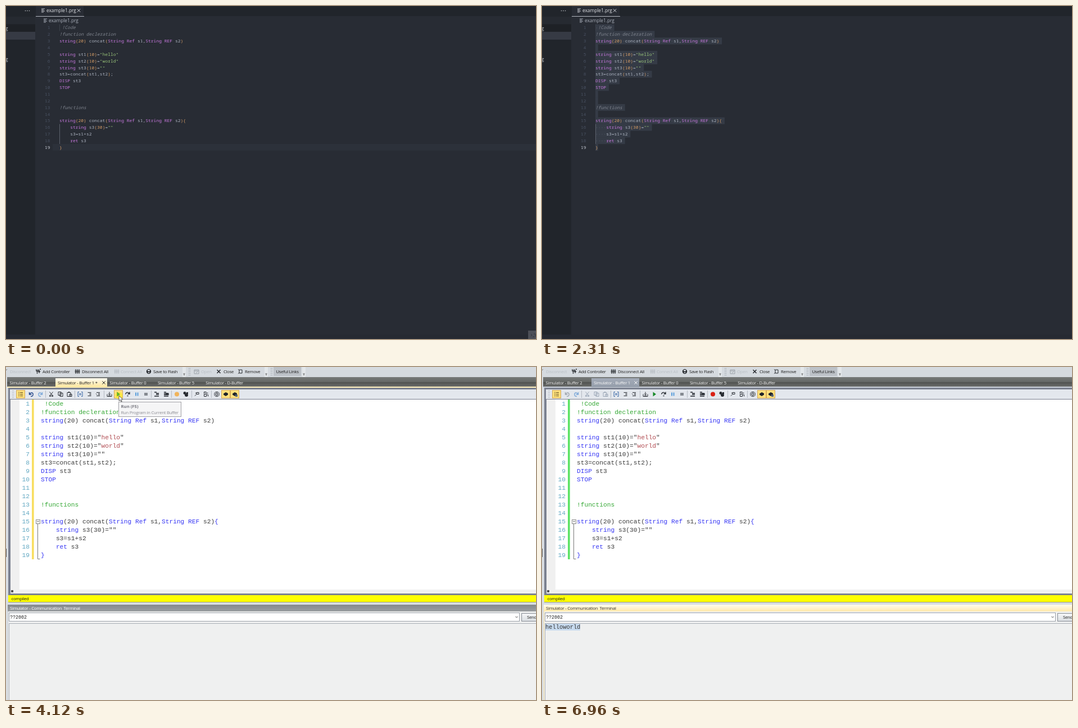
An HTML page with a canvas for the animation above (7.36 s loop, 943 by 594 pixels).

```html
<!DOCTYPE html>
<html lang="en">
<head>
<meta charset="utf-8">
<title>String concat demo</title>
<style>
html, body { margin: 0; width: 100%; height: 100%; overflow: hidden; background: #282c34; }
canvas { display: block; }
</style>
</head>
<body>
<canvas id="stage" width="943" height="594"></canvas>
<script>
const ctx = document.getElementById('stage').getContext('2d');
const LOOP = 7360;
const MONO = '"Liberation Mono", monospace';
const DARK_MONO = '"Noto Sans Mono", monospace';
const UI = '"Open Sans", sans-serif';

const code = ` !Code
!function decleration
string(20) concat(String Ref s1,String REF s2)

string st1(10)="hello"
string st2(10)="world"
string st3(10)=""
st3=concat(st1,st2);
DISP st3
STOP


!functions

string(20) concat(String Ref s1,String REF s2){
    string s3(30)=""
    s3=s1+s2
    ret s3
}`.split('\n');

const TOKEN = /(?<comment>!.*)|(?<keyword>\b(?:string|ref|disp|stop|ret)\b)|(?<word>hello|world)|(?<quote>"+)|(?<number>\b\d+\b)|(?<paren>[()])|(?<brace>[{}])|(?<plain>\w+|[^\s\w])/gi;
const darkTheme = {
  comment: '#7f848e', keyword: '#c678dd', word: '#98c379', quote: '#98c379',
  number: '#d19a66', paren: '#d19a66', brace: '#d19a66', plain: '#abb2bf'
};
const lightTheme = {
  comment: '#35a835', keyword: '#3636f4', word: '#b04a50', quote: '#3c3c3c',
  number: '#3c3c3c', paren: '#3c3c3c', brace: '#3636f4', plain: '#3c3c3c'
};

function rect(x, y, w, h, fill, stroke) {
  if (fill) { ctx.fillStyle = fill; ctx.fillRect(x, y, w, h); }
  if (stroke) { ctx.strokeStyle = stroke; ctx.lineWidth = 1; ctx.strokeRect(x + .5, y + .5, w - 1, h - 1); }
}

function gradient(x, y, w, h, ...colors) {
  const g = ctx.createLinearGradient(0, y, 0, y + h);
  colors.forEach((c, i) => g.addColorStop(i / (colors.length - 1), c));
  rect(x, y, w, h, g);
}

function text(str, x, y, color, font, align = 'left', spacing = 0) {
  ctx.font = font;
  ctx.letterSpacing = spacing + 'px';
  ctx.textAlign = align;
  ctx.fillStyle = color;
  ctx.fillText(str, x, y);
}

const label = (str, x, y, color = '#1e1e1e') => text(str, x, y, color, '7.7px ' + UI, 'left', -.25);

function icon(x, y, path, color, filled, width = 1) {
  ctx.save();
  ctx.translate(x, y);
  const p = new Path2D(path);
  ctx.fillStyle = ctx.strokeStyle = color;
  ctx.lineWidth = width;
  filled ? ctx.fill(p) : ctx.stroke(p);
  ctx.restore();
}

function disc(x, y, r, color) {
  ctx.fillStyle = color;
  ctx.beginPath();
  ctx.arc(x, y, r, 0, 7);
  ctx.fill();
}

function drawCode(x, baseline, pitch, step, theme, size, family, italics) {
  code.forEach((line, i) => {
    for (const m of line.matchAll(TOKEN)) {
      const kind = Object.keys(m.groups).find(k => m.groups[k]);
      const style = italics && kind === 'comment' ? 'italic ' : '';
      text(m[0], x + m.index * pitch, baseline + i * step, theme[kind], `${style}${size}px ${family}`);
    }
  });
}

// Position along [time, x, y] points, eased between each pair; null outside.
function follow(t, points) {
  for (let i = 1; i < points.length; i++) {
    const [t0, x0, y0] = points[i - 1], [t1, x1, y1] = points[i];
    if (t >= t0 && t < t1) {
      const u = (t - t0) / (t1 - t0), k = u * u * (3 - 2 * u);
      return [x0 + (x1 - x0) * k, y0 + (y1 - y0) * k];
    }
  }
  return null;
}

const IBEAM = 'M-2-4.5h1.5l.5.5l.5-.5h1.5M0-4v8M-2 4.5h1.5l.5-.5l.5.5h1.5';
const FILE_LINES = 'M-3-2.5h6M-3-.5h4M-3 1.5h6M-3 3.5h4';
const CROSS = 'M-2.7-2.7l5.4 5.4M2.7-2.7l-5.4 5.4';

const darkPointer = [[510, 226, 604], [850, 232, 420.5], [1320, 232, 420.5], [1950, 76, 602]];

function drawDark(t) {
  const X = 95, PITCH = 4.79, STEP = 11.86, TOP = 32.6;
  const lineTop = i => TOP + i * STEP;
  const clicked = t >= 920 && t < 1250, selected = t >= 1250;
  const uiFont = '8.3px ' + UI;

  rect(0, 0, 943, 594, '#282c34');
  rect(0, 0, 52, 586, '#21252b');
  rect(52, 0, 891, 18, '#21252b');
  rect(0, 19, 52, 13, '#262a31');
  rect(0, 33, 52, 13, '#1e2126');
  rect(0, 46, 52, 14, '#363a44');
  rect(0, 586, 943, 8, '#262a32');
  rect(53, 0, 85, 18, '#282c34');
  rect(53, 18, 86, 1, '#b4b8c0');
  [34.5, 38, 41.5].forEach(x => disc(x, 8.5, .8, '#c5c8ce'));
  [43, 98].forEach(y => text('g', 3.5, y, '#c5c8ce', uiFont, 'right'));
  icon(66, 7.5, FILE_LINES, '#c5c8ce');
  text('example1.prg', 72, 11, '#e0e2e6', uiFont);
  icon(129.5, 8, CROSS, '#d7dae0');
  icon(70, 25.5, FILE_LINES, '#a5abb6');
  text('example1.prg', 76, 29, '#a9afba', uiFont);

  if (selected) {
    code.forEach((line, i) => {
      const last = i === code.length - 1;
      rect(X, lineTop(i), (line.length + !last) * PITCH, STEP + .2, '#353b46');
      [...line].forEach((c, col) => {
        if (c === ' ') rect(X + (col + .4) * PITCH, lineTop(i) + 6, 1, 1, '#555c69');
      });
    });
  } else {
    rect(83, lineTop(18), 860, STEP, '#2c313a');
  }
  rect(X, lineTop(0), 1, STEP, '#3d424b');
  rect(X, lineTop(15), 1, 3 * STEP, '#5c626d');
  if (clicked) {
    [[46, 14], [0, 18]].forEach(([col, i]) =>
      rect(X + col * PITCH, lineTop(i) + .4, PITCH + .4, 11, '#515a6b', '#6b7280'));
  }
  code.forEach((_, i) => text(i + 1, 78.5, lineTop(i) + 8.8,
    i === 18 ? '#c3c8d1' : '#495162', '7.98px ' + DARK_MONO, 'right'));
  drawCode(X, TOP + 8.8, PITCH, STEP, darkTheme, 7.98, DARK_MONO, true);
  if (clicked) rect(99, lineTop(18), 1.4, STEP, '#6f9bff');

  const p = follow(t, darkPointer);
  if (p) icon(p[0], p[1], IBEAM, '#e4e6ea');
  if (t < 70) {
    rect(929, 579, 14, 15, '#4d5058');
    icon(937, 587, 'M-3-2l2 2l-2 2M0 3h3M2-2h3v5', '#30343c');
  }
}

const lightPointer = [
  [2510, 150, 604], [2740, 192, 250], [3000, 190, 230], [3560, 201, 51], [4480, 201, 51],
  [5060, 68.5, 464], [5270, 68.5, 464], [5420, 6.5, 464], [5950, 6.5, 464], [6500, 848, 584]
];

const UNDO = 'M-3.5-3.5v4h4M-3 0C-1-4 4-3 3 1C3 3 1 4-1 4';
const REDO = 'M3.5-3.5v4h-4M3 0C1-4-4-3-3 1C-3 3-1 4 1 4';
const INDENT = 'M-3-3h6M0-1h3M0 1h3M-3 3h6';
const PLUGS = 'M-3-4v8M0-4v8M3-4v8M-4.5-1h3M-1.5-1h3M1.5-1h3M-4.5 1h9';
const COMMENT = 'M-4-3.5h4M-1-1.5h5M-1 .5h5M-4 3.5h8';
const DROP = 'M-1.5 3h3M-1 5h2';

function drawTopBar() {
  rect(0, 0, 943, 18, '#d5dadf');
  const ink = '#25282c', off = '#b9bfc5';
  label('Disconnect', 7, 11, off);
  icon(0, 6, 'M0 0l2-2', '#777');
  icon(58, 8, 'M-4-4v3h3v-3M-2.5-1v5M1-3v6M-1 0h4M2-4h2', ink, false, 1.3);
  label('Add Controller', 65, 11);
  icon(127, 8, PLUGS, ink, false, 1.2);
  label('Disconnect All', 135, 11);
  icon(197, 8, PLUGS, off, false, 1.2);
  label('Connect All', 204, 11, off);
  disc(254, 8, 4.2, ink);
  rect(252, 5, 4, 2.5, '#d5dadf');
  rect(252.5, 9, 3, 2, '#a8adb4');
  label('Save to Flash', 262, 11);
  icon(339, 8, 'M-4-3h8v7h-8zM-4-1h8M-1 3l3-3', '#9ba1a8');
  label('Open', 347, 11, off);
  icon(378.5, 8, 'M-3-3l6 6M3-3l-6 6', ink, false, 1.5);
  label('Close', 387, 11);
  icon(417, 8, 'M-2-3h5v6h-5zM-4-4l2 2M-4 4l2-2', ink);
  label('Remove', 425, 11);
  rect(476, 0, 49, 16, '#bcc1c7');
  label('Useful Links', 480.5, 11);
  [317, 463, 530].forEach(x => {
    rect(x - 3, 0, 6, 18, '#e3e7ea');
    icon(x, 9, DROP, '#444');
  });
  [326, 472].forEach(x => {
    for (let y = 2; y < 16; y += 3) rect(x - 1, y, 1, 1, '#8d949c'), rect(x + 1, y, 1, 1, '#8d949c');
  });
}

function drawTabs(saved, focused) {
  gradient(2, 18, 941, 9, '#777a79', '#646765');
  gradient(2, 27, 941, 8, '#505250', '#6a6c6a');
  rect(2, 35, 941, 2, focused ? '#fff0bd' : '#c9cfd8');
  const shift = saved ? 7 : 0;
  const names = ['Buffer 0', 'Buffer 5', 'D-Buffer'];
  label('Simulator - Buffer 2', 6.5, 31, '#f4f4f4');
  names.forEach((n, i) => label('Simulator - ' + n, 184.5 + 85.4 * i - shift, 31, '#f4f4f4'));
  if (focused) gradient(88, 20, 92 - shift, 16, '#fffaf0', '#fff0c6', '#ffe69c');
  else gradient(88, 20, 92 - shift, 16, '#a3abb8', '#949daa');
  const ink = focused ? '#222' : '#f8f8f8';
  label('Simulator - Buffer 1' + (saved ? '' : ' *'), 92, 31, ink);
  icon(174 - shift, 28, CROSS, ink);
}

function drawToolbar(pasted, ran, focused, hover) {
  const ink = '#262a30', blue = '#3565a5', off = '#a0a7b0';
  const edit = focused ? ink : '#9aa6b6', needsCode = pasted ? ink : '#8a9098', y = 48.5;
  rect(7, 40, 936, 17, '#e3e7ed');
  rect(7, 57, 936, 1, '#7b8190');
  for (let i = 42; i < 56; i += 3) rect(11, i, 1, 1, '#9aa0a8'), rect(13, i, 1, 1, '#9aa0a8');
  [18, 383, 399].forEach(x => rect(x, 41, 16, 15, '#ffe07c', '#d3a85a'));
  if (hover) rect(192, 41, 16, 15, '#ffe07c', '#d3a85a');
  [70, 122, 174, 258, 294, 330, 365].forEach(x => rect(x, 42, 1, 13, '#b4bac3'));

  icon(26, y, 'M-1-3h5M-1 0h5M-1 3h5M-3-4v2M-3-1v2M-3 2v2', '#5b4a20');
  icon(45, y, UNDO, focused ? '#22468a' : off, false, 1.4);
  icon(61, y, REDO, '#7aa7d8', false, 1.4);
  icon(80.5, y, 'M-3-4L2 2M3-4L-2 2M-3 2h2v2h-2zM1 2h2v2h-2z', edit);
  icon(97, y, 'M-4-4h5v6h-5zM-1-2h5v6h-5z', edit);
  icon(113, y, 'M-4-3h6v7h-6zM-2-4h2M0 0h4v4h-4z', edit);
  icon(132, y, 'M-2-4h-2v8h2M2-4h2v8h-2M-2-1h4M-2 1h4', blue);
  icon(148.5, y, INDENT, ink);
  icon(164, y, INDENT + 'M-4-1l2 2', ink);
  icon(184, y, 'M0-4v5M-2-1l2 2l2-2M-4 0v4h8v-4M-2 2.5h4', ink);
  icon(200, y, 'M-2.5-4L3 0L-2.5 4z', ran ? '#178a28' : ink, true);
  icon(216.5, y, 'M-4 0C-3-4 2-4 3-1M3.5-4v3.5h-3.5M-1 3h2', ink, false, 1.3);
  icon(232.5, y, 'M-2.5-3h2v6h-2zM1-3h2v6h-2z', '#5a9fdb', true);
  rect(246, 46, 6, 5, '#858a91');
  icon(268, y, COMMENT, needsCode, false, 1.3);
  icon(285, y, COMMENT + 'M-4-1h8v2h-8', needsCode, false, 1.3);
  disc(304, 48.5, 4, ran ? '#d92015' : '#f0b45c');
  disc(318, 46.5, 2.5, needsCode);
  disc(321, 50, 3, needsCode);
  rect(321, 45, 3, 3, needsCode);
  icon(340, y, 'M-4 3l3-3M-1-3h4v3h-4zM-3-2h2', ink);
  icon(355.5, y, 'M-3-1v-3h4M-1-2h5M-3 0h4v4h-4zM2 1h2v3', ink);
  icon(375, y, 'M-2-4h4l2 2v4l-2 2h-4l-2-2v-4zM-1.5-2h3v4h-3z', ink);
  [391, 407].forEach(x => icon(x, y, 'M-4-1L0-3.5L4-1.5V1L0 3.5L-4 1z', '#1f2329', true));
  rect(408, 49, 4, 4, '#55606e');
}

function drawLight(t) {
  const X = 62, PITCH = 6.72, STEP = 14.97, BASE = 69.2;
  const pasted = t >= 2930, ran = t >= 4400, printed = t >= 4540, focused = t < 5270;
  const p = follow(t, lightPointer);
  const hover = p && Math.abs(p[0] - 200) < 8 && p[1] > 41 && p[1] < 57;

  rect(0, 0, 943, 594, '#d8dde2');
  drawTopBar();
  drawTabs(ran, focused);

  rect(4, 37, 939, 370, '#7b8190');
  drawToolbar(pasted, ran, focused, hover);
  rect(8, 58, 935, 346, '#fff');
  rect(8, 58, 16, 346, '#f0f0f0');
  rect(8, 397, 935, 7, '#f0f0f0');
  rect(9, 398, 4, 4, '#555');
  rect(0, 324, 1, 15, '#555');

  const codeFont = '11.2px ' + MONO;
  rect(46, 58, 3.7, pasted ? 285 : 16, ran ? '#5fe368' : '#f8de62');
  code.slice(0, pasted ? code.length : 1).forEach((_, i) =>
    text(i + 1, 42, BASE + i * STEP, '#62a8c2', codeFont, 'right'));
  if (pasted) {
    drawCode(X, BASE, PITCH, STEP, lightTheme, 11.2, MONO);
    rect(53, 272, 8, 8, '#fff', '#888');
    icon(57, 276, 'M-2-.5h4M-.5 4v62.5h4', '#777');
  }
  if (focused && Math.floor((t - 2380) / 530) % 2 === 0) {
    if (pasted) rect(69, 328, 1, 15, '#000');
    else rect(61.5, 59, 1.5, 15, '#000');
  }

  rect(4, 407, 939, 12, '#ff0');
  rect(4, 419, 939, 1, '#9c9c78');
  label('compiled', 9.5, 416);
  if (focused) gradient(3, 424, 940, 12, '#85898c', '#9a9ea1');
  else gradient(3, 424, 940, 12, '#fffbee', '#ffe9aa');
  label('Simulator - Communication  Terminal', 7, 433, focused ? '#fff' : '#333');
  rect(3, 436, 940, 158, focused ? '#c9ced4' : '#ffe9aa');
  rect(4, 436, 939, 158, '#eff0f0');
  rect(5, 438, 909, 16, '#fff', '#9aa0a8');
  text('??2002', 7, 449, '#222', '8.35px ' + MONO);
  icon(908.5, 446, 'M-2-1l2 2l2-2', '#444');
  gradient(917, 439, 26, 15, '#f7f8f9', '#d9dde1');
  rect(917, 439, 30, 15, null, '#868c94');
  label('Send', 927, 449);
  rect(5, 457, 942, 140, '#eff0f0', '#a9aeb5');

  if (!focused) {
    const left = t < 5420 ? p[0] : 6;
    rect(left, 458, Math.max(0, 68 - left), 12, '#c8dbef');
    if (t >= 5420 && t < 6960) rect(5, 457, 1, 13, '#444');
  }
  if (p) disc(p[0], p[1], 6.5, 'rgba(255, 236, 40, .65)');
  if (hover) icon(200, 48.5, 'M-2.5-4L3 0L-2.5 4z', '#5fb52a', true);
  if (printed) text('helloworld', 6, 467, '#333', '10.4px ' + MONO);

  if (t >= 3910 && t < 4330) {
    rect(200, 62, 112, 27, '#f5f5f6', '#a0a0a5');
    text('Run (F5)', 204.5, 72.5, '#77777f', 'bold 7.7px ' + UI);
    label('Run Program in Current Buffer', 204.5, 84, '#8a8a92');
  }
  if (!p) return;
  const overText = (p[1] > 58 && p[1] < 397) || p[1] > 457;
  if (overText) return icon(p[0], p[1], IBEAM, '#666');
  const arrow = 'M0 0v9.5l2.2-2l1.7 3.5l1.5-.7l-1.6-3.3h3z';
  icon(p[0], p[1], arrow, '#fff', true);
  icon(p[0], p[1], arrow, '#333', false, .8);
}

function frame(now) {
  const t = now % LOOP;
  t < 2380 ? drawDark(t) : drawLight(t);
  requestAnimationFrame(frame);
}
requestAnimationFrame(frame);
</script>
</body>
</html>
```
